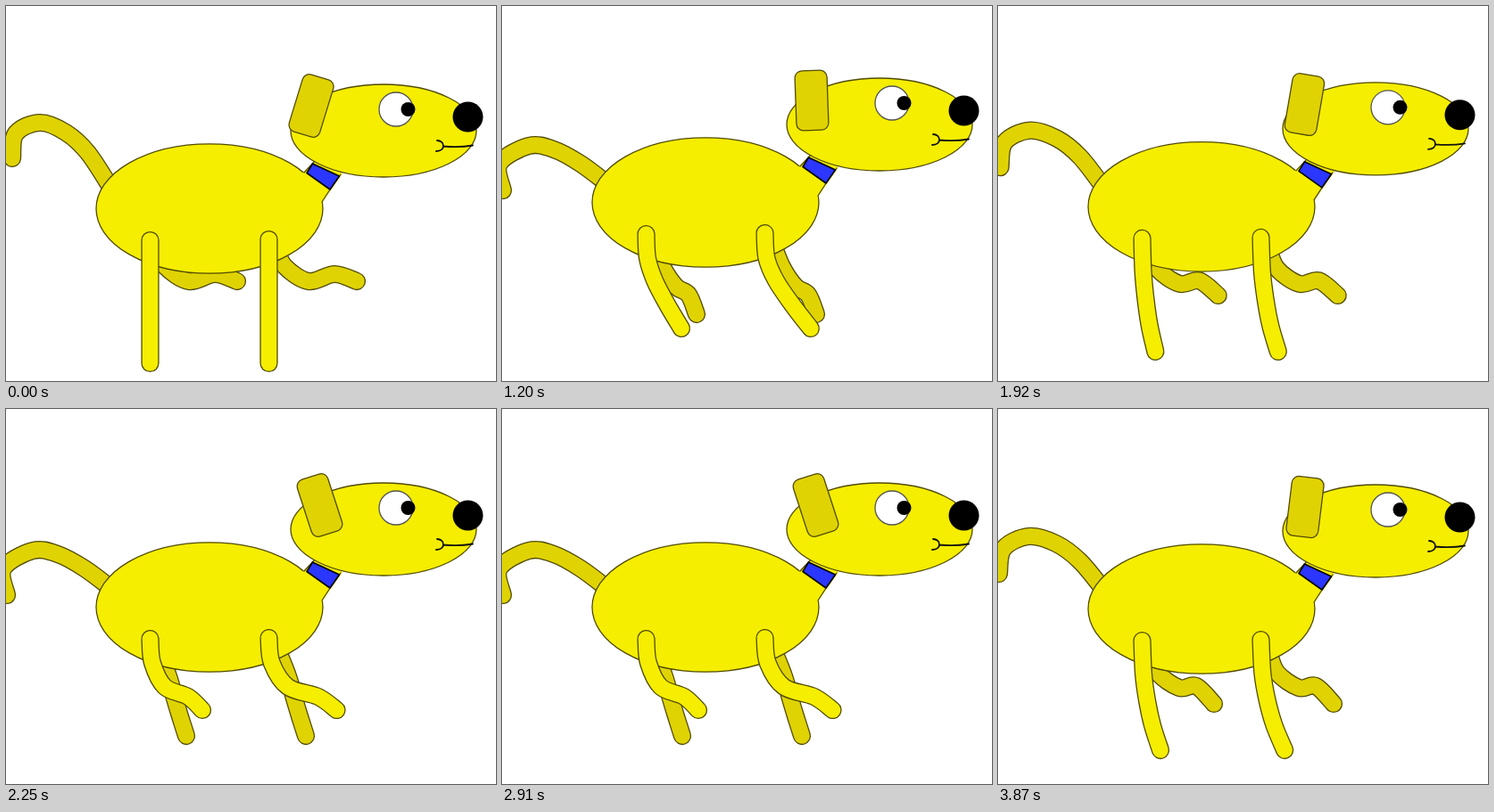
Animation of 549x421 px, one loop 3.9 s. Source, as an HTML page with a canvas:

```html
<!DOCTYPE html>
<html lang="en">
<head>
<meta charset="utf-8">
<title>Running dog</title>
<style>
  html, body { margin: 0; width: 100%; height: 100%; overflow: hidden; background: #fff; }
  canvas { display: block; width: 549px; height: 421px; }
</style>
</head>
<body>
<canvas id="stage" width="549" height="421"></canvas>
<script>
const ctx = document.getElementById('stage').getContext('2d');
const LOOP = 3900, TICK = 30, STRIDE = 22;
const YELLOW = '#f5ee00', SHADE = '#e0d304', LINE = '#514b00', BLUE = '#2b36ff';

// Stride timing: tick within the stride -> position along the pose list
const timing = [[0, 0], [2, .45], [8, 3], [11.5, 4], [15, 3.2], [17, 2], [18, 1], [20, .45], [22, 0]];

// Five poses from near leg straight to far leg straight; coordinates without the body bob
const bob = [0, -3, -7, -5, 0];
const ear = [[342, 112, 17], [344, 113, 7], [347, 113, -2], [351.5, 113, -18], [354, 113, -26]];
const nearLeg = [
  [161.5, 300, 161.5, 335, 161.5, 370, 161.5, 401],
  [163, 300, 167, 330, 173, 358, 182, 386],
  [163, 290, 171, 315, 185, 342, 201, 369],
  [164, 290, 178, 317, 204, 328, 220, 343],
  [166, 290, 190, 310, 222, 305, 250, 312]
];
const farLeg = [
  [178, 292, 205, 309, 234, 301, 259, 309],
  [178, 298, 203, 316, 222, 314, 242, 334],
  [180, 300, 195, 322, 209, 331, 218, 353],
  [182, 305, 189, 330, 195, 350, 202, 372],
  [171, 305, 173, 335, 176, 365, 178, 393]
];
const tailUp = [92, 165, 67, 142, 38, 131, 11, 143, 7, 171];
const tailLow = [88, 184, 58, 168, 30, 164, -3, 184, 1, 214];
const tail = [tailUp, [92, 174, 65, 154, 34, 146, 6, 160, 1, 188], tailLow, tailLow, tailUp];

const mix = (a, b, k) => Array.isArray(a) ? a.map((v, i) => mix(v, b[i], k)) : a + (b - a) * k;

function poseAt(list, s) {
  const i = Math.min(Math.floor(s), list.length - 2);
  return mix(list[i], list[i + 1], s - i);
}

function stridePosition(tick) {
  const i = timing.findIndex(([at]) => at > tick);
  const [t0, a] = timing[i - 1], [t1, b] = timing[i];
  return mix(a, b, (tick - t0) / (t1 - t0));
}

function paint(fill, line = LINE, width = 1.3) {
  if (fill) { ctx.fillStyle = fill; ctx.fill(); }
  if (line) { ctx.strokeStyle = line; ctx.lineWidth = width; ctx.stroke(); }
}

function oval(x, y, rx, ry, fill, line) {
  ctx.beginPath();
  ctx.ellipse(x, y, rx, ry, 0, 0, Math.PI * 2);
  paint(fill, line);
}

function poly(pts, fill, line, width, open) {
  ctx.beginPath();
  for (let i = 0; i < pts.length; i += 2) ctx.lineTo(pts[i], pts[i + 1]);
  if (!open) ctx.closePath();
  paint(fill, line, width);
}

// Smooth rounded tube through flat x,y points
function hose(flat, fill) {
  const n = flat.length / 2;
  const at = i => {
    const k = Math.max(0, Math.min(n - 1, i)) * 2;
    return [flat[k], flat[k + 1]];
  };
  ctx.beginPath();
  ctx.moveTo(...at(0));
  for (let i = 0; i < n - 1; i++) {
    const [a, b, c, d] = [at(i - 1), at(i), at(i + 1), at(i + 2)];
    ctx.bezierCurveTo(b[0] + (c[0] - a[0]) / 6, b[1] + (c[1] - a[1]) / 6,
      c[0] - (d[0] - b[0]) / 6, c[1] - (d[1] - b[1]) / 6, c[0], c[1]);
  }
  paint(null, LINE, 20.2);
  paint(null, fill, 17.6);
}

const moveX = (pts, f) => pts.map((v, i) => i % 2 ? v : f(v));

function drawHead(s) {
  oval(423, 140, 104, 52, YELLOW, LINE);
  oval(437, 116, 19, 19, '#fff', '#555');
  oval(450.5, 116, 8, 8, '#000', null);
  oval(517.5, 124.5, 17, 17, '#000', null);

  ctx.beginPath();
  ctx.moveTo(483, 151);
  ctx.bezierCurveTo(492, 151, 493, 163, 482, 163);
  ctx.moveTo(490, 157.5);
  ctx.quadraticCurveTo(508, 159, 523, 156.5);
  paint(null, '#111', 1.8);

  const [x, y, angle] = poseAt(ear, s);
  ctx.save();
  ctx.translate(x, y);
  ctx.rotate(angle * Math.PI / 180);
  ctx.beginPath();
  ctx.roundRect(-18, -33.5, 36, 67, 8);
  paint(SHADE);
  ctx.restore();
}

function drawNeck() {
  poly([322, 198, 346, 174, 377, 188, 354, 221], YELLOW, null);
  poly([334, 187, 346, 174], null, LINE, 1.3, true);
  poly([375, 189, 363, 206, 354, 220], null, LINE, 1.3, true);
  poly([343.5, 177, 373.5, 191, 363, 206, 337, 187.5], BLUE, '#000', 1.6);
}

function drawDog(s) {
  const near = poseAt(nearLeg, s), far = poseAt(farLeg, s);
  ctx.save();
  ctx.translate(0, poseAt(bob, s));
  hose([120, 208, ...poseAt(tail, s)], SHADE);
  hose([168, 270, ...far], SHADE);
  hose([302, 270, ...moveX(far, x => x + 134)], SHADE);
  oval(228, 227.5, 127, 72.7, YELLOW, LINE);
  drawNeck();
  drawHead(s);
  hose([161.5, 263, ...near], YELLOW);
  hose([294.5, 262, ...moveX(near, x => 294.5 + (x - 161.5) * 1.3)], YELLOW);
  ctx.restore();
}

ctx.lineCap = ctx.lineJoin = 'round';
const start = performance.now();

function frame() {
  const t = (performance.now() - start) % LOOP;
  const tick = Math.max(0, Math.floor(t / TICK) - 1);
  ctx.fillStyle = '#fff';
  ctx.fillRect(0, 0, 549, 421);
  drawDog(stridePosition(tick % STRIDE));
  requestAnimationFrame(frame);
}
frame();
</script>
</body>
</html>
```
